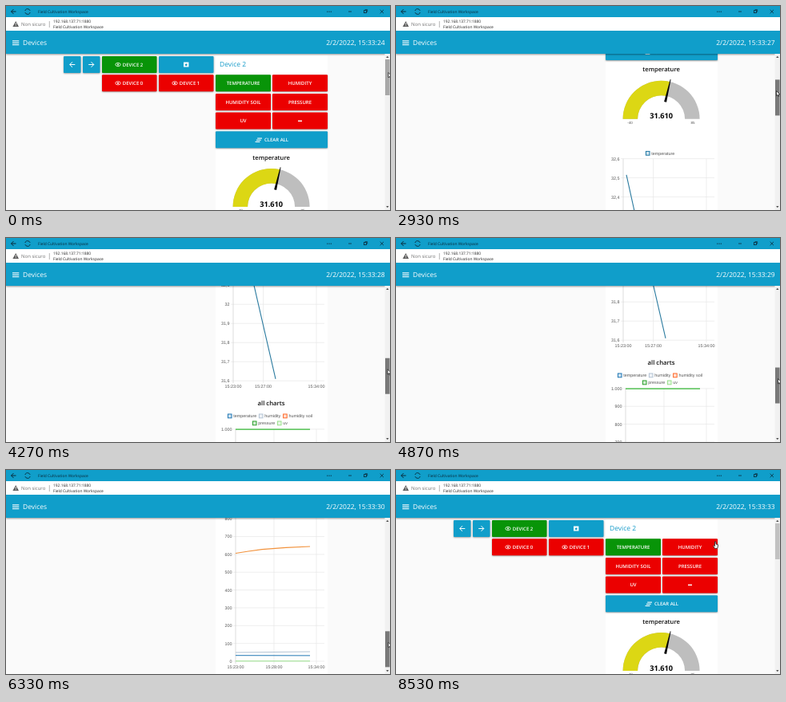
Write an HTML page with a canvas that moves like this. It is 480x256 px and loops after 8.59 s.

```html
<!DOCTYPE html>
<html lang="en">
<head>
<meta charset="utf-8">
<title>Devices</title>
<style>
  html, body { margin: 0; width: 100%; height: 100%; overflow: hidden; background: #fafafa; }
  canvas { display: block; }
</style>
</head>
<body>
<canvas id="stage" width="480" height="256"></canvas>
<script>
const ctx = document.getElementById('stage').getContext('2d');
const LOOP = 8590, TOP = 60, PX_PER_THUMB = 4.33;
const UI = '"Open Sans", "Noto Sans", sans-serif';
const CHART = '"Liberation Sans", Arial, sans-serif';
const BLUE = '#109eca', RED = '#eb0000', GREEN = '#089408', INK = '#0b2a3a';
const TITLE = 'Field Cultivation Workspace';

// Keyframes: [time, value]
const scrollKeys = [[1930, 0], [2070, 7], [2930, 110], [4270, 362.5], [5470, 464.5],
  [6220, 586], [6900, 586], [7470, 200], [7800, 60], [8050, 0]];
const cursorKeys = [[1070, 478], [1850, 475.5], [2930, 475.5], [4270, 477],
  [5470, 478], [8120, 478], [8450, 398.5]];

function tween(keys, t) {
  if (t <= keys[0][0]) return keys[0][1];
  for (let i = 1; i < keys.length; i++) {
    const [t0, a] = keys[i - 1], [t1, b] = keys[i];
    if (t < t1) return a + (b - a) * (t - t0) / (t1 - t0);
  }
  return keys[keys.length - 1][1];
}

function text(string, x, y, size, color, { align = 'left', weight = 400, font = UI } = {}) {
  ctx.font = `${weight} ${size}px ${font}`;
  ctx.textAlign = align;
  ctx.fillStyle = color;
  ctx.fillText(string, x, y + size * 0.36);
}

function rect(x, y, w, h, color) {
  ctx.fillStyle = color;
  ctx.fillRect(x, y, w, h);
}

function line(color, width, ...points) {
  ctx.strokeStyle = color;
  ctx.lineWidth = width;
  ctx.beginPath();
  points.forEach(([x, y]) => ctx.lineTo(x, y));
  ctx.stroke();
}

function shape(fill, points, stroke) {
  ctx.beginPath();
  points.forEach(([x, y]) => ctx.lineTo(x, y));
  ctx.closePath();
  ctx.fillStyle = fill;
  ctx.fill();
  if (stroke) {
    ctx.strokeStyle = stroke;
    ctx.lineWidth = 0.8;
    ctx.stroke();
  }
}

function arrow(x, y, size, dir, color) {
  const tip = x + dir * size;
  line(color, 1, [x - dir * size, y], [tip, y]);
  line(color, 1, [tip - dir * size, y - size], [tip, y], [tip - dir * size, y + size]);
}

function button(x, y, w, color, label = '', labelX = x + w / 2) {
  ctx.save();
  ctx.shadowColor = 'rgba(0,0,0,.4)';
  ctx.shadowBlur = 2;
  ctx.shadowOffsetY = 0.8;
  ctx.fillStyle = color;
  ctx.beginPath();
  ctx.roundRect(x, y, w, 21, 1);
  ctx.fill();
  ctx.restore();
  text(label, labelX, y + 10.5, 6, '#fff', { align: 'center', weight: 600 });
}

function deviceButton(x, y, color, label) {
  button(x, y, 68.5, color, label, x + 38.5);
  ctx.strokeStyle = ctx.fillStyle = '#fff';
  ctx.lineWidth = 0.8;
  ctx.beginPath();
  ctx.ellipse(x + 20, y + 10.5, 3.2, 2.1, 0, 0, 7);
  ctx.stroke();
  ctx.beginPath();
  ctx.arc(x + 20, y + 10.5, 1.1, 0, 7);
  ctx.fill();
}

function drawButtons() {
  button(72, 63, 21.5, BLUE);
  arrow(83, 73.5, 3.3, -1, '#fff');
  button(96, 63, 21.5, BLUE);
  arrow(106.5, 73.5, 3.3, 1, '#fff');
  deviceButton(120, 63, GREEN, 'DEVICE 2');
  button(191, 63, 68.5, BLUE);
  rect(222, 70.5, 6.4, 6, '#fff');
  shape(BLUE, [[223.5, 74], [225.2, 72], [226.9, 74], [225.2, 75.5]]);
  deviceButton(120, 86.3, RED, 'DEVICE 0');
  deviceButton(191, 86.3, RED, 'DEVICE 1');

  [['TEMPERATURE', 'HUMIDITY'], ['HUMIDITY SOIL', 'PRESSURE'], ['UV', '']].forEach((row, r) =>
    row.forEach((label, c) =>
      button(262 + c * 71, 86.3 + r * 23.6, 69, label === 'TEMPERATURE' ? GREEN : RED, label)));
  rect(365, 143.6, 5, 1.4, '#fff');
  button(262, 157.3, 140, BLUE, 'CLEAR ALL', 338);
  for (let i = 0; i < 3; i++) rect(314.2 - i * 1.3, 165.5 + i * 2.2, 5.8, 1.1, '#fff');
}

function drawGauge() {
  const x = 331.6, y = 252, angle = Math.PI * (1 + (31.61 + 40) / 125);
  const band = (from, to, color) => {
    ctx.fillStyle = color;
    ctx.beginPath();
    ctx.arc(x, y, 48, from, to);
    ctx.arc(x, y, 29.5, to, from, true);
    ctx.fill();
  };
  band(Math.PI, 2 * Math.PI, '#bebebe');
  band(Math.PI, angle, '#dcd714');
  ctx.save();
  ctx.translate(x, y);
  ctx.rotate(angle);
  shape('#000', [[22, -1.5], [51, -0.4], [51, 0.4], [22, 1.5]]);
  ctx.restore();
  text('31.610', x, 248.2, 9.2, '#000', { align: 'center', weight: 700 });
  text('-40', 292.5, 256.5, 4.5, '#555', { align: 'center', font: CHART });
  text('85', 371, 256.5, 4.5, '#555', { align: 'center', font: CHART });
}

function legend(x, y, label, color) {
  rect(x, y - 2.6, 5.2, 5.2, color + '33');
  ctx.strokeStyle = color;
  ctx.lineWidth = 1;
  ctx.strokeRect(x + 0.4, y - 2.4, 4.6, 4.8);
  text(label, x + 7.2, y, 5.4, '#555', { font: CHART });
}

function drawAxes(left, top, step, labels, times) {
  const bottom = top + 10 * step;
  labels.forEach((label, i) => {
    const y = top + i * step;
    line('#e7e7e7', 0.7, [left - 3, y], [398, y]);
    text(label, left - 4.6, y, 5.4, '#555', { align: 'right', font: CHART });
  });
  times.forEach(([x, label], i) => {
    line(i ? '#e7e7e7' : '#cfcfcf', 0.7, [x, top], [x, bottom + 3]);
    text(label, x, bottom + 7, 5.4, '#555', { align: 'center', font: CHART });
  });
}

function drawCharts() {
  legend(312, 295, 'temperature', '#1f77a4');
  const degrees = Array.from({ length: 11 }, (_, i) => String((326 - i) / 10).replace('.', ','));
  drawAxes(284, 301.8, 24, degrees, [[284, '15:23:00'], [321.6, '15:27:00'], [388, '15:34:00']]);
  line('#2a7a9f', 1.1, [288, 322], [310, 422], [337, 539.5]);

  text('all charts', 331.6, 570.3, 7.7, '#111', { align: 'center', weight: 600 });
  legend(277, 586, 'temperature', '#1f77b4');
  legend(316, 586, 'humidity', '#b4c4d4');
  legend(346.2, 586, 'humidity soil', '#ff6a2a');
  legend(308, 595, 'pressure', '#2ca02c');
  legend(339, 595, 'uv', '#98df8a');
  const counts = Array.from({ length: 11 }, (_, i) => i ? String(1000 - i * 100) : '1.000');
  drawAxes(287, 602.5, 22.35, counts, [[287, '15:23:00'], [335, '15:28:00'], [388, '15:34:00']]);
  line('#35b835', 1.3, [287, 602.8], [380, 602.8]);
  line('#f2923c', 1.2, [287, 690.5], [303, 688], [320, 685.6], [350, 683.3], [380, 682]);
  line('#b4c4d4', 1, [287, 815], [380, 814]);
  line('#1f77b4', 1, [287, 818.7], [380, 818.9]);
  line('#98df8a', 1, [287, 825.8], [380, 825.8]);
}

function drawPage(scroll) {
  ctx.save();
  ctx.beginPath();
  ctx.rect(0, TOP, 474, 196);
  ctx.clip();
  ctx.translate(0, -scroll);
  rect(262, 62, 140, 800, '#fff');
  text('Device 2', 267, 73, 8.5, '#169bc9');
  drawButtons();
  text('temperature', 331.6, 189.8, 7.6, '#111', { align: 'center', weight: 600 });
  drawGauge();
  drawCharts();
  ctx.restore();
}

function drawWindow(seconds) {
  ctx.save();
  ctx.shadowColor = 'rgba(0,0,0,.4)';
  ctx.shadowBlur = 2;
  ctx.shadowOffsetY = 0.5;
  rect(0, 31, 480, 29, BLUE);
  ctx.restore();
  rect(0, 0, 480, 14, BLUE);
  rect(0, 14, 480, 17, '#fff');

  arrow(9.5, 7, 3, -1, INK);
  ctx.strokeStyle = INK;
  ctx.lineWidth = 0.9;
  for (const start of [0.3, 3.44]) {
    ctx.beginPath();
    ctx.arc(27, 7, 3.3, start, start + 2.5);
    ctx.stroke();
  }
  text(TITLE, 40, 7, 4.9, INK);
  for (let i = 0; i < 3; i++) rect(401.2 + i * 2.3, 6.6, 1.1, 1.1, INK);
  line(INK, 0.8, [428, 7], [432, 7]);
  ctx.strokeRect(447.5, 5.6, 3, 3);
  line(INK, 0.7, [448.7, 4.6], [451.6, 4.6], [451.6, 7.6]);
  line(INK, 0.8, [467.6, 4.8], [472, 9.2]);
  line(INK, 0.8, [472, 4.8], [467.6, 9.2]);

  shape('#5c5c5c', [[12.2, 19], [16, 26], [8.4, 26]]);
  rect(11.8, 21.3, 0.9, 2.2, '#fff');
  rect(11.8, 24.2, 0.9, 0.9, '#fff');
  text('Non sicuro', 19, 22.8, 6, '#707070');
  line('#999', 0.7, [54.3, 19], [54.3, 27]);
  text('192.168.137.71:1880', 59, 19.3, 4.9, '#222');
  text(TITLE, 59, 26.6, 4.9, '#222');

  for (let i = 0; i < 3; i++) rect(8, 43.3 + i * 2.4, 8.3, 1.1, '#fff');
  text('Devices', 21, 46, 8.5, '#fff');
  text(`2/2/2022, 15:33:${seconds}`, 473.6, 46, 8.5, '#fff', { align: 'right' });
}

function drawScrollbar(thumbY, dragging, hovered) {
  rect(473.5, TOP, 6.5, 196, '#f1f1f1');
  rect(474, thumbY, 5.6, 45, dragging ? '#787878' : hovered ? '#a8a8a8' : '#c1c1c1');
  shape('#505050', [[476.8, 62.8], [478.5, 65], [475.1, 65]]);
  shape('#505050', [[476.8, 253.2], [478.5, 251], [475.1, 251]]);
}

function drawCursor(x, y) {
  ctx.save();
  ctx.translate(x, y);
  if (x < 402) {
    shape('#fff', [[0, 0], [1.3, 0], [1.5, 3], [4, 3.8], [3.7, 7], [2.9, 8.4], [0, 8.4],
      [-2, 5.3], [-1.3, 4.7], [0, 5.6]], '#222');
  } else {
    shape('#fff', [[0, 0], [0, 6.3], [1.5, 5], [2.5, 7.2], [3.4, 6.8], [2.5, 4.6], [4.4, 4.5]], '#222');
  }
  ctx.restore();
}

function draw(now) {
  const t = now % LOOP;
  const scroll = tween(scrollKeys, t);
  const thumbY = 67 + scroll / PX_PER_THUMB;
  const cursorX = tween(cursorKeys, t);
  const cursorY = tween([[1070, 83.5], [1850, thumbY + 14]], t) +
    tween([[8120, 0], [8450, 9]], t);

  ctx.textRendering = 'geometricPrecision';
  rect(0, 0, 480, 256, '#fafafa');
  drawPage(scroll);
  drawWindow(24 + Math.floor((t + 630) / 1000));
  drawScrollbar(thumbY, t > 1850 && t < 8100, cursorX > 473);
  drawCursor(cursorX, cursorY);
  requestAnimationFrame(draw);
}

let start;
requestAnimationFrame(function begin(now) {
  start = now;
  const tick = draw;
  tick(0);
});
</script>
</body>
</html>
```
